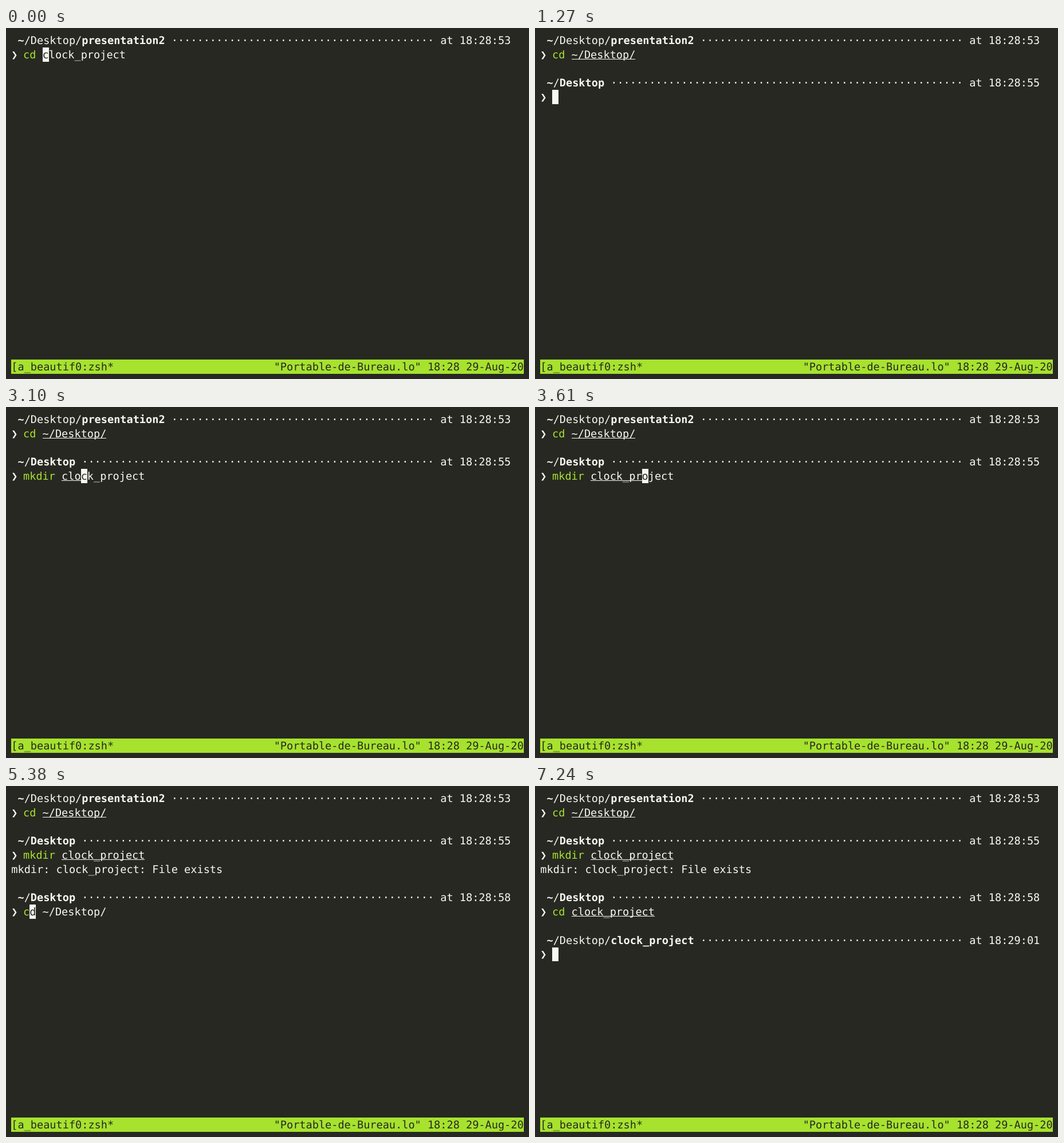
Animation, 913 px wide and 613 px high, one loop 8000 ms. Source, as an HTML page with a canvas:

```html
<!DOCTYPE html>
<html lang="en">
<head>
<meta charset="utf-8">
<title>Terminal session</title>
<style>
html, body { margin: 0; width: 100%; height: 100%; overflow: hidden; background: #272822; }
canvas { display: block; }
</style>
</head>
<body>
<canvas id="screen" width="913" height="613"></canvas>
<script>
const ctx = document.getElementById('screen').getContext('2d');
const BG = '#272822', FG = '#f8f8f2', GREEN = '#a6e22e', PINK = '#f92672';
const LOOP = 8000;

// Terminal grid: 80 x 24 cells, half an em of padding
const SIZE = 18.57, PAD = SIZE / 2;
const CELL = SIZE * 0.602, LINE = SIZE * 4 / 3, BASE = SIZE * 1.0127;
const ARROW = SIZE * 0.516;          // the prompt arrow is narrower than a cell
const SHIFT = ARROW - CELL;
const FAMILY = '"DejaVu Sans Mono", "DejaVu Sans", monospace';

// Each key stands for how long a state lasts, in ms
const TICKS = { 1: 60, 2: 130, 3: 190, 9: 1000 };
const COMMANDS = /^(c|cd|mkdir)$/;
const HISTORY = ['cd clock_project', 'mkdir clock_project', 'cd ~/Desktop/'];

const shells = [
  { row: 0, parent: '/Desktop/', dir: 'presentation2', time: '18:28:53',
    cmd: 'cd ~/Desktop/', from: 3, rhythm: '121212122123' },
  { row: 3, parent: '/', dir: 'Desktop', time: '18:28:55',
    cmd: 'mkdir clock_project', from: 0, rhythm: '921212122122122122122',
    output: 'mkdir: clock_project: File exists' },
  { row: 7, parent: '/', dir: 'Desktop', time: '18:28:58',
    cmd: 'cd clock_project', from: 0, rhythm: '922122122121221222' },
  { row: 10, parent: '/Desktop/', dir: 'clock_project', time: '18:29:01',
    cmd: '', from: 0, rhythm: '9' }
];

const steps = [];
let clock = 0;
shells.forEach((shell, index) => {
  [...shell.rhythm].forEach((key, i) => {
    steps.push({ at: clock, index, typed: shell.from + i });
    clock += TICKS[key];
  });
});

function block(x, row, width, color) {
  const left = Math.round(x), top = Math.round(PAD + row * LINE);
  ctx.fillStyle = color;
  ctx.fillRect(left, top, Math.round(x + width) - left,
    Math.round(PAD + (row + 1) * LINE) - top);
}

// Writes text on the grid and returns the x position after it
function write(text, x, row, { color = FG, bold = false, underline = false } = {}) {
  const y = PAD + row * LINE + BASE;
  const end = x + text.length * CELL;
  ctx.font = `${bold ? 'bold ' : ''}${SIZE}px ${FAMILY}`;
  ctx.fillStyle = color;
  [...text].forEach((ch, i) => {
    if (ch !== ' ') ctx.fillText(ch, x + i * CELL, y);
  });
  if (underline && text) {
    ctx.fillRect(Math.round(x), Math.round(y) + 1, Math.round(end) - Math.round(x), 1);
  }
  return end;
}

function cursor(x, row, ch = ' ') {
  block(x, row, CELL, FG);
  write(ch, x, row, { color: BG });
}

function drawHeader({ row, parent, dir, time }) {
  let x = write('~', PAD + CELL, row, { bold: true });
  x = write(parent, x, row);
  x = write(dir, x, row, { bold: true });
  const first = 3 + parent.length + dir.length;
  write('·'.repeat(66 - first) + ' at ' + time, x + CELL, row);
}

function drawCommand(text, row) {
  const space = text.indexOf(' ');
  const split = space < 0 ? text.length : space + 1;
  const word = text.slice(0, split);
  const known = COMMANDS.test(word.trim());
  const x = write(word, PAD + CELL * 2 + SHIFT, row,
    { color: known ? GREEN : PINK, bold: !known });
  return write(text.slice(split), x, row, { underline: true });
}

function suggest(text, index) {
  if (!text) return '';
  const recent = shells.slice(0, index).map(s => s.cmd).reverse();
  const match = [...recent, ...HISTORY].find(cmd => cmd.startsWith(text));
  return match ? match.slice(text.length) : '';
}

function drawShell(shell, index, step) {
  const active = index === step.index;
  const typed = active ? step.typed : shell.cmd.length;
  const text = shell.cmd.slice(0, typed);
  const row = shell.row + 1;
  drawHeader(shell);
  write('❯', PAD, row);
  const x = drawCommand(text, row);

  if (!active) {
    if (shell.output) write(shell.output, PAD, row + 1);
  } else if (typed > shell.cmd.length) {
    cursor(PAD, row + 1);
  } else {
    const hint = suggest(text, index);
    cursor(x, row, hint[0]);
    write(hint.slice(1), x + CELL, row);
  }
}

function drawStatus() {
  const right = '"Portable-de-Bureau.lo" 18:28 29-Aug-20';
  block(PAD, 23, CELL * 80, GREEN);
  write('[a_beautif0:zsh*', PAD, 23, { color: BG });
  write(right, PAD + (80 - right.length) * CELL, 23, { color: BG });
}

function draw(time) {
  const step = steps.filter(s => s.at <= time).pop();
  ctx.fillStyle = BG;
  ctx.fillRect(0, 0, 913, 613);
  shells.slice(0, step.index + 1).forEach((shell, i) => drawShell(shell, i, step));
  drawStatus();
}

ctx.textRendering = 'geometricPrecision';
const start = performance.now();
function tick() {
  draw((performance.now() - start) % LOOP);
  requestAnimationFrame(tick);
}
tick();
</script>
</body>
</html>
```
